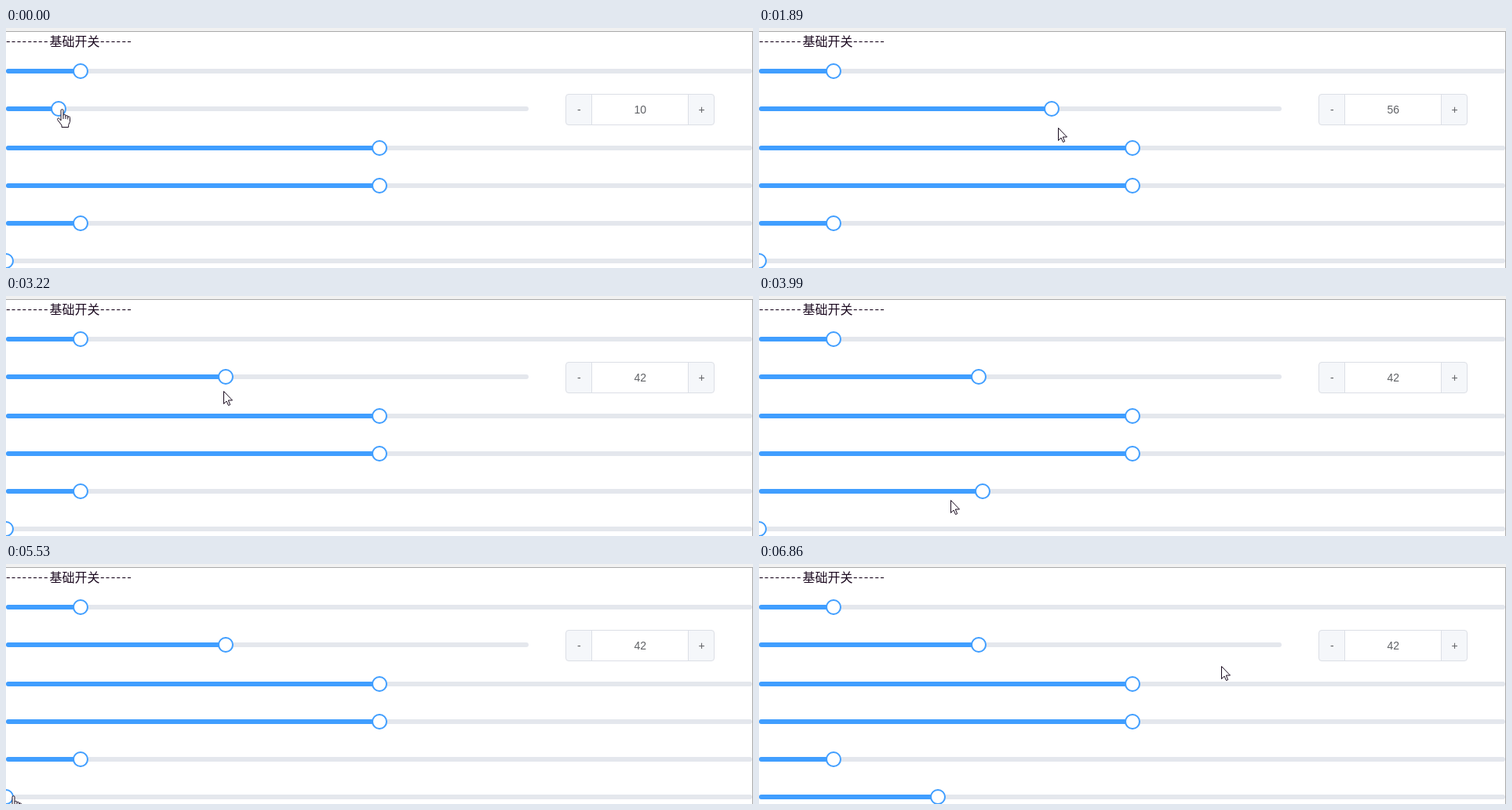
An HTML page for the animation above (7.21 s loop, 952 by 306 pixels).

```html
<!DOCTYPE html>
<html lang="zh">
<head>
<meta charset="utf-8">
<title>Sliders</title>
<style>
  html, body { margin: 0; width: 100%; height: 100%; overflow: hidden; background: #fff; }
  svg { display: block; width: 952px; height: 306px; }
  .title { font: 16px "Noto Sans CJK SC", "Noto Sans CJK", sans-serif; fill: #1c0a20; }
  .dashes { letter-spacing: 1.3px; }
  .number { font: 14px "Liberation Sans", Arial, sans-serif; fill: #606266; text-anchor: middle; }
  .rail { fill: #e4e7ed; }
  .bar { fill: #409eff; }
  .knob { fill: #fff; stroke: #409eff; stroke-width: 2; }
  .cursor { fill: #fff; stroke: #1a0c20; stroke-linejoin: round; }
</style>
</head>
<body>
<svg viewBox="0 0 952 306">
  <rect width="952" height="306" fill="#fff"/>
  <rect width="952" height="4" fill="#f1f1f1"/>
  <rect y="4" width="952" height="1" fill="#a9a9a9"/>
  <text class="title dashes" x="0" y="22">--------</text>
  <text class="title" x="55.5" y="23">基础开关</text>
  <text class="title dashes" x="120" y="22">------</text>

  <rect x="713.5" y="84.5" width="189" height="39" rx="3.5" fill="#f5f7fa" stroke="#dcdfe6"/>
  <path d="M746.5 85V123H869.5V85" fill="#fff"/>
  <path d="M746.5 85V123M869.5 85V123" stroke="#dcdfe6"/>
  <text class="number" x="730.3" y="109">-</text>
  <text class="number" x="886.5" y="109">+</text>
  <text class="number" id="value" x="808.3" y="109">10</text>

  <g id="sliders"></g>
  <rect x="951" y="4" width="1" height="302" fill="#a9a9a9"/>
  <path class="cursor" id="arrow" d="M.5 .5V16.5L4 13L6.5 18.5L8.7 17.6L6.3 12H11.5Z"/>
  <path class="cursor" id="hand" d="M5 15V2.2A1.5 1.5 0 0 1 8 2.2V8.5A1.5 1.3 0 0 1 11 8.8V9.6A1.4 1.3 0 0 1 13.8 10V11A1.3 1.3 0 0 1 16.5 11.5V16.5L14.7 20.5V23.5H6V21L1 14.5C-.2 12.4 1.8 11 3.2 12.7ZM8 8.5V13M11 9.5V13M13.8 11V13.5"/>
</svg>
<script>
const LOOP = 7210, TICK = 70;
const $ = id => document.getElementById(id);
const clamp = (v, low, high) => Math.min(Math.max(v, low), high);
const smooth = p => p * p * (3 - 2 * p);

// Pointer gestures: when each starts and ends, and where it leads.
const home = { x: 72, y: 103 };
const gestures = [
  { start: 865, end: 1680, x: 455, y: 127 },
  { start: 1750, end: 2170, x: 168, y: 125 },
  { start: 2170, end: 2520, x: 324, y: 115 },
  { start: 2520, end: 2800, x: 372, y: 120 },
  { start: 2870, end: 3150, x: 288, y: 118 },
  { start: 3150, end: 3640, x: 92, y: 247 },
  { start: 3640, end: 4100, x: 270, y: 270 },
  { start: 4200, end: 4690, x: 100, y: 266 },
  { start: 4690, end: 4970, x: -1, y: 286 },
  { start: 5180, end: 5530, x: 10, y: 295 },
  { start: 5530, end: 5880, x: 171, y: 325 },
  { start: 6090, end: 6300, x: 228, y: 325 },
  { start: 6580, end: 6650, x: 331, y: 282 },
  { start: 6650, end: 6860, x: 589, y: 130 }
];

function pointerAt(time) {
  let { x, y } = home;
  for (const g of gestures) {
    const p = clamp((time - g.start) / (g.end - g.start), 0, 1);
    x += (g.x - x) * smooth(p);
    y += (g.y - y) * p * p;
  }
  return { x, y };
}

function add(tag, attrs) {
  const node = document.createElementNS('http://www.w3.org/2000/svg', tag);
  for (const name in attrs) node.setAttribute(name, attrs[name]);
  return $('sliders').appendChild(node);
}

// A slider follows the pointer between grab and release, if it has them.
class Slider {
  constructor(y, { width = 951, value = 50, step = 1, offset = 0, grab, release }) {
    Object.assign(this, { y, width, value, step, offset, grab, release });
    add('rect', { class: 'rail', y: y - 3, width, height: 6, rx: 3 });
    this.bar = add('path', { class: 'bar' });
    this.knob = add('circle', { class: 'knob', cy: y, r: 9 });
  }
  draw(time) {
    const { y, width, step } = this;
    if (this.release) {
      const { x } = pointerAt(clamp(time, this.grab, this.release));
      this.value = Math.round((x - this.offset) / (width * step / 100)) * step;
    }
    this.x = Math.round(width * this.value / 100);
    this.bar.setAttribute('d', this.x ? `M${this.x} ${y - 3}H3A3 3 0 0 0 3 ${y + 3}H${this.x}Z` : '');
    this.knob.setAttribute('cx', this.x);
  }
  isUnder(p) {
    return Math.hypot(p.x - this.x, p.y - this.y) < 14;
  }
}

const sliders = [
  { value: 10 },
  { width: 666, offset: 8, grab: 0, release: 3150 },
  {},
  {},
  { step: 10, grab: 3640, release: 4690 },
  { step: 3, grab: 5250, release: 6300 }
].map((options, i) => new Slider(55 + 48 * i + (i > 1 ? 2 : 0), options));

function draw(now) {
  const time = Math.floor(now % LOOP / TICK) * TICK;
  for (const slider of sliders) slider.draw(time);
  $('value').textContent = sliders[1].value;

  const pointer = pointerAt(time);
  const over = sliders.some(slider => slider.isUnder(pointer));
  $('hand').style.display = over ? '' : 'none';
  $('arrow').style.display = over ? 'none' : '';
  $(over ? 'hand' : 'arrow').setAttribute('transform',
    `translate(${Math.round(pointer.x) - (over ? 7 : 0)} ${Math.round(pointer.y)})`);
}

const start = performance.now();
function frame() {
  draw(performance.now() - start);
  requestAnimationFrame(frame);
}
frame();
</script>
</body>
</html>
```
